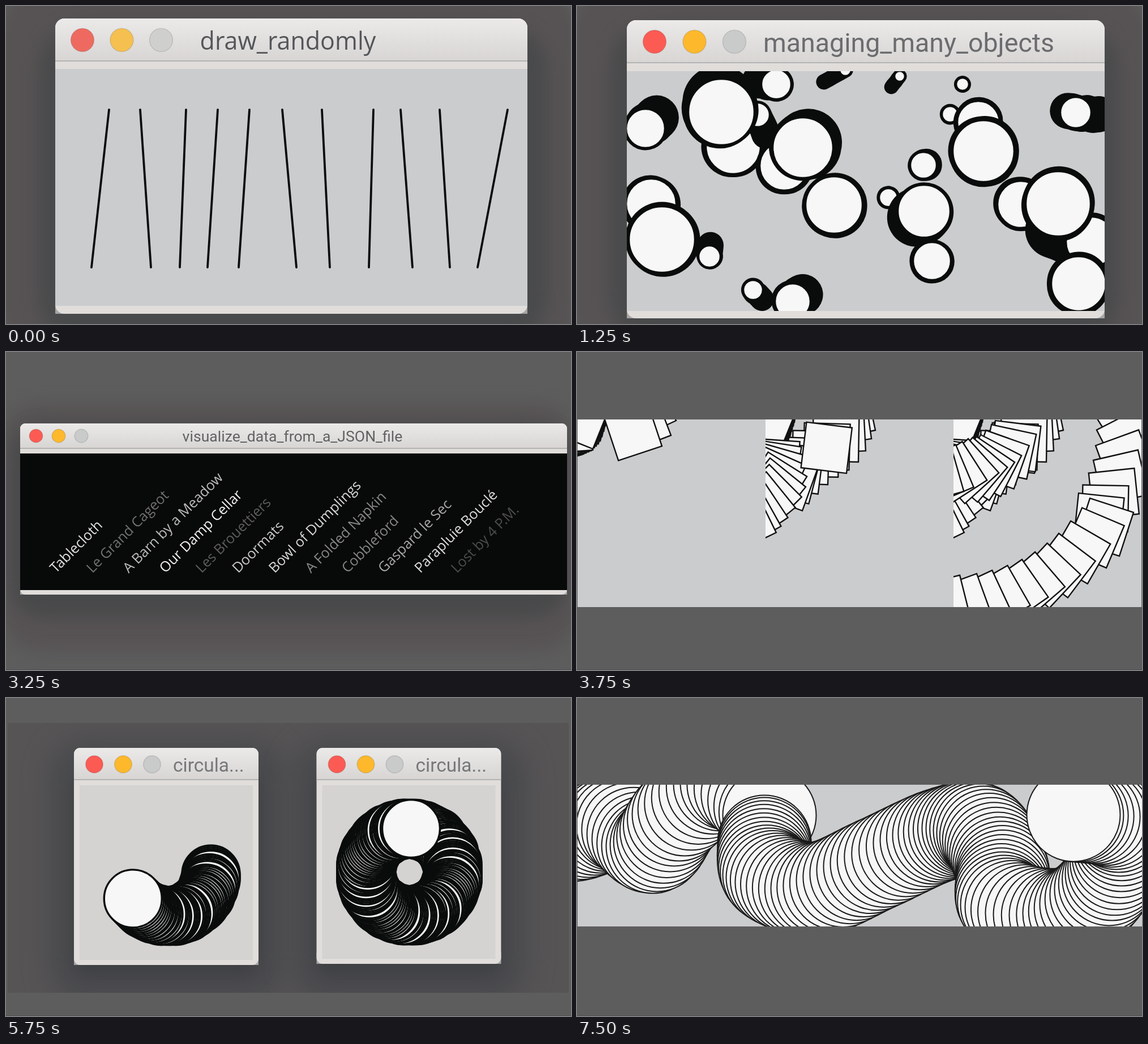
Animation of 998x561 px, one loop 8000 ms. Source, as an HTML page:

```html
<!DOCTYPE html>
<html lang="en">
<head>
<meta charset="utf-8">
<title>Sketch gallery</title>
<style>
html, body { margin: 0; width: 100%; height: 100%; overflow: hidden; background: #5d5d5d; }
#stage { display: block; width: 998px; height: 561px; }
.slide { visibility: hidden; }
.slide.on { visibility: visible; }
text { white-space: pre; }
.sf { font-family: Roboto, Inter, sans-serif; }
.humanist { font-family: "Open Sans", "Noto Sans", sans-serif; }
</style>
</head>
<body>
<svg id="stage" viewBox="0 0 998 561">
  <defs>
    <linearGradient id="bar" x1="0" y1="0" x2="0" y2="1">
      <stop offset="0" stop-color="#ebeae9"/>
      <stop offset="1" stop-color="#d4d1cf"/>
    </linearGradient>
  </defs>
</svg>
<script>
const INK = '#0a0c0c', PAPER = '#f7f7f7', GREY = '#cbccce', BACK = '#5d5d5d', WARM = '#575354';
const VIVID = ['#fc5b53', '#fdb82c', '#c9cbcb'];

// --- drawing helpers, each returns SVG markup ---
const rect = (x, y, w, h, fill, more = '') =>
  `<rect x="${x}" y="${y}" width="${w}" height="${h}" fill="${fill}" ${more}/>`;
const circle = (x, y, r, fill, more = '') =>
  `<circle cx="${x.toFixed(2)}" cy="${y.toFixed(2)}" r="${r}" fill="${fill}" ${more}/>`;
const path = (points, width) =>
  `<path d="M${points.map(p => p.map(v => v.toFixed(1)).join(' ')).join('L')}" fill="none" stroke="${INK}"
    stroke-width="${width}" stroke-linecap="round" stroke-linejoin="round"/>`;
const label = (s, x, y, size, fill, font, more = '') =>
  `<text x="${x}" y="${y}" font-size="${size}" fill="${fill}" class="${font}" ${more}>${s}</text>`;
const clip = (x, y, w, h, body) =>
  `<svg x="${x}" y="${y}" width="${w}" height="${h}" viewBox="${x} ${y} ${w} ${h}">${body}</svg>`;
const glow = (x, y, w, h, r, fill, blur) =>
  rect(x, y, w, h, fill, `rx="${r}" style="filter:blur(${blur}px)"`);
const backdrop = rect(0, 0, 998, 561, BACK) + rect(0, 560, 998, 1, '#4f4f4f');
const halo = glow(-8, -40, 1014, 660, 90, WARM, 10) + glow(58, 32, 898, 560, 80, '#494a4b', 14);

// Draws `steps` items per segment along a smooth curve through the keys.
function trail(keys, steps, draw) {
  const at = i => keys[Math.max(0, Math.min(keys.length - 1, i))];
  const spline = (a, b, c, d, t) =>
    b + t * (c - a + t * (2 * a - 5 * b + 4 * c - d + t * (3 * (b - c) + d - a))) / 2;
  let out = '';
  for (let n = 0; n <= (keys.length - 1) * steps; n++) {
    const i = Math.floor(n / steps), t = n / steps - i;
    out += draw(...keys[0].map((_, c) => spline(at(i - 1)[c], at(i)[c], at(i + 1)[c], at(i + 2)[c], t)));
  }
  return out;
}

function seeded(seed) {
  return () => (seed = (seed * 16807) % 2147483647) / 2147483647;
}

function win({ x, y, w, h, bar, top, foot, side = 0, r, lights, fill, colors = VIVID }) {
  const [lx, ly, gap, lr] = lights;
  const dots = colors.map((c, i) =>
    circle(lx + i * gap, ly, lr, c, 'stroke="#000" stroke-opacity=".12" stroke-width="1.5"')).join('');
  return rect(x, y + h - 20, w, 20, '#a5a5a6') +
    rect(x, y, w, h, '#e0dddb', `rx="${r}"`) +
    clip(x, y, w, bar, rect(x, y, w, bar + r, 'url(#bar)', `rx="${r}"`)) +
    rect(x, y + bar, w, 2, '#b3b4b3') +
    rect(x + side, y + top, w - 2 * side, h - top - foot, fill) + dots;
}

// --- slides ---
function sticks() {
  const tops = [182, 237, 318, 374, 430, 488, 558, 649, 697, 766, 886];
  const lean = [-31, 19, -11, -18, -19, 25, 14, -8, 21, 18, -53];
  return backdrop + halo +
    win({ x: 87, y: 22, w: 834, h: 521, bar: 74, top: 89, foot: 14, r: 16, fill: GREY,
      lights: [135, 60, 69.5, 20.5], colors: ['#ee6a60', '#f5c04f', '#cfcfcd'] }) +
    label('draw_randomly', 342.6, 77, 42.9, '#55565a', 'humanist') +
    tops.map((x, i) => path([[x, 183], [x + lean[i], 461]], 3.8)).join('');
}

function bubbles() {
  // Each bug: x, y, radius and, for long trails, where it came from.
  const bugs = [
    [276, 248, 47], [319, 192, 20, 15, 34], [352, 138, 25, -30, -6], [255, 187, 57, -6, -15],
    [366, 282, 42], [399, 250, 52, 12, -10], [454, 351, 49], [121, 216, 33, 20, -19], [131, 349, 43],
    [150, 412, 57], [234, 442, 18, 1, -20], [311, 501, 16, 15, 16], [381, 521, 30, 16, -12],
    [474, 113, 9, -38, 21], [570, 124, 8, -15, 19], [681, 138, 10], [659, 191, 13], [709, 205, 36],
    [718, 256, 53], [881, 188, 26, 40, 4], [881, 188, 26, -13, -3], [612, 281, 22, 6, -1],
    [550, 338, 15], [613, 362, 45, -13, 10], [627, 450, 32], [784, 350, 40], [908, 416, 43, -68, -20],
    [850, 349, 56], [886, 490, 47]
  ];
  const rnd = seeded(11);
  const draw = ([x, y, r, dx = 0, dy = 0]) => {
    const jitter = () => (rnd() - 0.5) * r * 0.1;
    const steps = [0, 0.25, 0.5, 0.75, 1].map(t => [x + dx * t + jitter(), y + dy * t + jitter()]);
    return path(steps, 2 * r + 8 + r * 0.14) + circle(x, y, r + 1, PAPER, `stroke="${INK}" stroke-width="2.5"`);
  };
  return backdrop + halo +
    win({ x: 88, y: 25, w: 844, h: 526, bar: 74, top: 90, foot: 13, r: 16, fill: GREY,
      lights: [137, 63, 70.5, 20.5] }) +
    label('managing_many_objects', 329, 81, 46.5, '#6b6c6f', 'sf') +
    clip(88, 115, 844, 423, bugs.map(draw).join(''));
}

function titles() {
  const rows = [
    ['Tablecloth', 226], ['Le Grand Cageot', 112], ['A Barn by a Meadow', 188], ['Our Damp Cellar', 242],
    ['Les Brouettiers', 92], ['Doormats', 202], ['Bowl of Dumplings', 216], ['A Folded Napkin', 135],
    ['Cobbleford', 132], ['Gaspard le Sec', 168], ['Parapluie Bouclé', 222], ['Lost by 4 P.M.', 76]
  ];
  return backdrop + glow(-10, 92, 1018, 436, 70, WARM, 14) + glow(8, 130, 982, 338, 60, '#48494a', 14) +
    win({ x: 25, y: 126, w: 966, h: 302, bar: 43, top: 53, foot: 8, r: 9, fill: '#080a09',
      lights: [53, 148, 40, 11.8] }) +
    label('visualize_data_from_a_JSON_file', 506, 158, 26.6, '#616263', 'sf', 'text-anchor="middle"') +
    rows.map(([s, v], i) => label(s, 0, 0, 24.9, `rgb(${v},${v},${v})`, 'humanist',
      `transform="translate(${88 + i * 64.4} 391) rotate(-45)"`)).join('');
}

function spin() {
  const SIDE = 81;
  // Keys are x, y, degrees of the square's top left or bottom right corner.
  const square = o => (x, y, a) => rect(o, o, SIDE, SIDE, PAPER,
    `stroke="#111" stroke-width="2.4" transform="translate(${x.toFixed(1)} ${y.toFixed(1)}) rotate(${a.toFixed(1)})"`);
  const fromTop = (keys, steps) => trail(keys, steps, square(0));
  const fromEnd = (keys, steps) => trail(keys, steps, square(-SIDE));

  const pile = fromEnd([[8, 62, -16], [27, 54, -4]], 5) + fromEnd([[51, 5, 8], [40, 38, 14], [27, 52, 22]], 4);
  const start = fromEnd([[174, 2, -25], [165, 28, -21]], 1) + pile + fromEnd([[149, 47, -18.4]], 1);
  const outer = fromEnd([[194, 19, -12], [164, 75, 1], [110, 115, 2], [65, 161, 20]], 3);
  const fan = fromEnd([[55, 120, 4], [20, 182, 39], [-54, 235, 64]], 5);
  const top = fromEnd([[143, 95, 7]], 1);
  const inner = fromTop([[74, 2, 7], [48, 27, 27], [26, 34, 48], [-4, 49, 74]], 3);
  const sweep = fromTop([[254, -1, -32], [247, 72, -13], [221, 130, 6]], 3) +
    fromTop([[241, 139, 18], [186, 201, 37], [121, 247, 55], [41, 272, 70], [-40, 275, 86]], 3);
  const panels = [start, outer + pile + fan + top, sweep + outer + pile + fan + top + inner];
  return backdrop + rect(1, 119, 996, 331, GREY) + panels.map((p, i) =>
    `<g transform="translate(${1 + i * 332} 119)">${clip(0, 0, 332, 331, p)}</g>`).join('');
}

function orbits() {
  const px = 3.06;
  // Centres snap to the sketch's coarse pixels, which makes the light bands.
  const snap = v => Math.round(25 * v) * px;
  const ring = (x, y, end) => {
    let out = '';
    for (let a = end % 0.05; a < end + 0.01; a += 0.05) {
      out += circle(x + snap(Math.cos(a)), y + snap(Math.sin(a)), 51, PAPER, `stroke="${INK}" stroke-width="3.4"`);
    }
    return out;
  };
  const frame = (x, h) => win({ x, y: 88, w: 326, h, bar: 55, top: 66, foot: 9, side: 10, r: 11, fill: '#d4d3d2',
    lights: [x + 36, 117, 51, 15.3] }) + label('circula...', x + 175, 130, 33.5, '#77787a', 'sf');
  const shade = x => glow(x - 48, 70, 424, 470, 70, '#4a4b4e', 20) + glow(x - 2, 130, 330, 362, 30, '#404144', 12);
  return backdrop + clip(3, 44, 991, 476, rect(3, 44, 991, 476, '#575455') + shade(120) + shade(548)) +
    frame(120, 383) + frame(548.5, 381) +
    ring(285.5, 308, 2.48) + ring(712.5, 307, 2 * Math.PI + 4.75);
}

function spirals() {
  const spiral = (x, y, turns) => {
    const points = [];
    for (let t = 0; t <= turns; t += 0.02) {
      const a = t * 2 * Math.PI;
      points.push([x + 11 * t * Math.cos(a), y + 11 * t * Math.sin(a)]);
    }
    return path(points, 5);
  };
  // x, y, width, height, spiral centre, turns
  const boxes = [
    [46, 181, 199, 201, 146, 1.73], [283, 182, 194, 201, 377, 3.52],
    [515, 183, 198, 199, 614, 8.175], [750, 180, 201, 205, 850, 10.9]
  ];
  return backdrop + rect(0, 158, 998, 248, WARM) + boxes.map(([x, y, w, h, cx, turns]) =>
    rect(x, y, w, h, '#d4d3d1') + clip(x + 1, y + 2, w - 2, h - 4, spiral(cx, 281.5, turns))).join('');
}

function tubes() {
  const disc = (x, y) => circle(x, y, 82.5, PAPER, 'stroke="#1a1a1a" stroke-width="2"');
  const body =
    trail([[-70, 246], [0, 240], [72, 222], [134, 262], [180, 205], [265, 150], [340, 207]], 7, disc) +
    trail([[331, 254], [340, 312], [425, 336], [530, 292], [640, 242], [712, 234], [750, 300],
      [760, 365], [870, 380], [945, 310], [957, 225], [877, 206]], 9, disc);
  return backdrop + clip(1, 153, 997, 250, rect(1, 153, 997, 250, GREY) + body);
}

// --- timeline ---
const LOOP = 8000, HOLD = 1250;
const stage = document.getElementById('stage');
stage.insertAdjacentHTML('beforeend',
  [sticks, bubbles, titles, spin, orbits, spirals, tubes].map(f => `<g class="slide">${f()}</g>`).join(''));
const slides = stage.querySelectorAll('.slide');
let shown = -1;

function tick() {
  const now = Math.floor((performance.now() % LOOP) / HOLD);
  if (now !== shown) {
    slides.forEach((s, i) => s.classList.toggle('on', i === now));
    shown = now;
  }
  requestAnimationFrame(tick);
}
tick();
</script>
</body>
</html>
```
